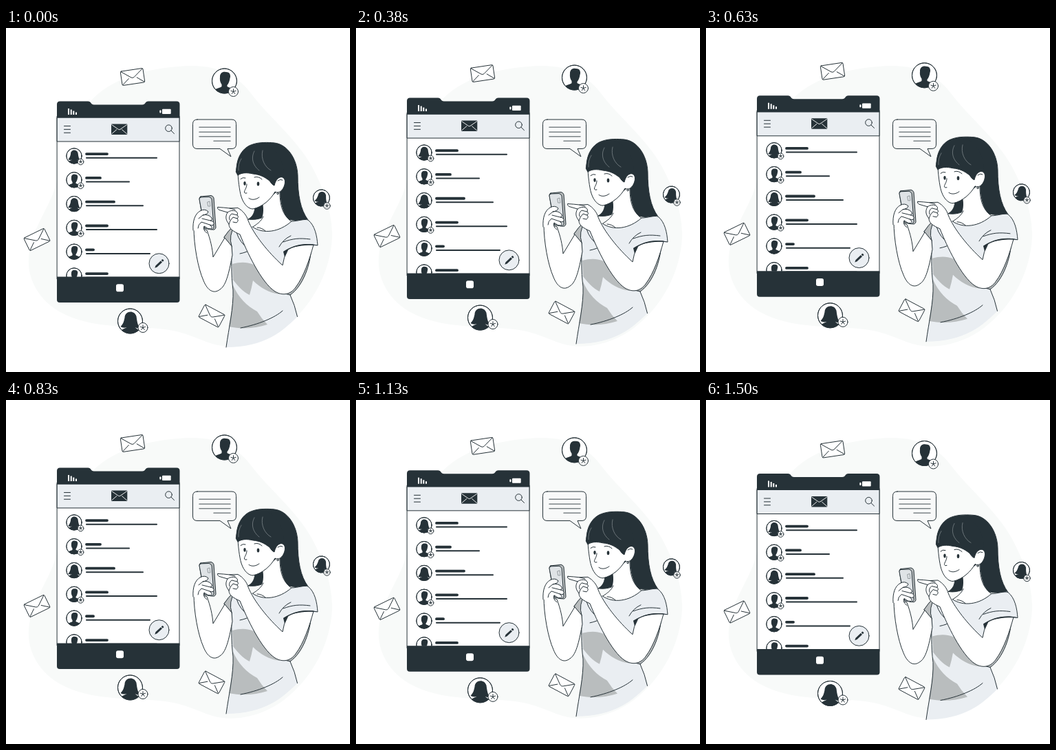
Recreate the animation shown at these times as an HTML page. Size 500 by 500 pixels, loop 1.54 s.

```html
<!DOCTYPE html>
<html lang="en">
<head>
<meta charset="utf-8">
<title>Messages</title>
<style>
  html, body { margin: 0; width: 100%; height: 100%; overflow: hidden; background: #fff; }
  svg { display: block; width: 100%; height: 100%; }
  .line { fill: none; stroke: #263238; stroke-width: 1; stroke-linecap: round; stroke-linejoin: round; }
  .white { fill: #fff; }
  .light { fill: #eaeef2; }
  .dark { fill: #263238; }
  .shade { fill: #b9bdbe; }
  .thin { stroke-width: .8; }
  .line, .line * { vector-effect: non-scaling-stroke; }
</style>
</head>
<body>
<svg viewBox="0 0 500 500">
  <defs>
    <clipPath id="disc"><circle r="18"/></clipPath>
    <clipPath id="screen"><rect x="75" y="165" width="177" height="197"/></clipPath>
    <g id="man">
      <circle r="18" class="line white"/>
      <path clip-path="url(#disc)" class="dark" d="M-6.500-5C-7-11-3-14 2-13C8-13.500 9.500-8 8-4C7.500 0 6 4 4 6V8C7 10 12 10 15 14V20H-14V13C-11 10-6 10-4 8V5C-6 2-7-1-6.500-5Z"/>
      <circle r="18" class="line"/>
    </g>
    <g id="woman">
      <circle r="18" class="line white"/>
      <path clip-path="url(#disc)" class="dark" d="M-8-5C-8-15 6-17 9-7C10 1 11 6 14 10C11 11 9 10 7 9C10 12 12 12 14 15V20H-13V14C-11 11-8 11-5 9C-8 10-11 10-14 8C-10 4-9 0-8-5Z"/>
      <circle r="18" class="line"/>
    </g>
    <g id="badge">
      <circle r="7" class="line white"/>
      <path class="line" d="M0 0V-3.8M0 0L3.6-1.2M0 0L2.2 3.1M0 0L-2.2 3.1M0 0L-3.6-1.2"/>
    </g>
    <g id="envelope" class="line white">
      <rect x="-16.5" y="-10.3" width="33" height="20.6" rx="1.6"/>
      <path class="line" d="M-15.7-9.7L-2 .8Q0 2 2 .8L15.7-9.7M-15.7 9.5L-6 1.8M15.7 9.5L6 1.8"/>
    </g>
  </defs>

  <path fill="#f8faf9" d="M266 55C310 54 337 70 356 95C382 130 424 162 446 204C464 238 474 271 474 301C473 351 447 403 404 436C375 458 334 469 300 459C275 451 258 440 222 437C169 433 112 436 71 408C45 390 31 362 33 334C36 291 64 263 74 223C84 181 94 137 126 103C160 69 215 57 266 55Z"/>

  <g class="line">
    <path fill="#f8f9f9" d="M278 133H328Q334.500 133 334.500 139.500V169Q334.500 175.500 328 175.500H322L327 187L311 175.500H278Q271.500 175.500 271.500 169V139.500Q271.500 133 278 133Z"/>
    <path stroke="#7d8487" stroke-width="1.600" d="M281 144.300H326M281 151.200H326M281 157.800H326M302 164.300H326"/>
  </g>

  <g id="floating">
    <g id="extras"></g>

    <!-- large phone -->
    <path class="line white" d="M74.500 128H252V365H74.500Z"/>
    <path class="line light" d="M74.500 130H252V165H74.500Z"/>
    <path class="dark" d="M74 130.500V111Q74 106.500 78.500 106.500H119C124 106.500 123 111.500 128 111.500H198C203 111.500 202 106.500 207 106.500H248Q252.500 106.500 252.500 111V130.500Z"/>
    <path class="white" d="M90 117H92V126H90ZM93.700 118.500H95.700V126H93.700ZM97.300 120.500H99.300V126H97.300ZM101 122.500H103V126H101Z"/>
    <rect class="white" x="227" y="117.800" width="12.700" height="7.200" rx="1"/>
    <rect class="white" x="223.300" y="119.500" width="2.200" height="4" rx=".8"/>
    <path class="line" d="M84.500 142.500H93.500M84.500 147.400H93.500M84.500 152.300H93.500M240 149.200L244.500 153.600"/>
    <circle class="line" cx="236.500" cy="145.700" r="4.800"/>
    <rect class="dark" x="153" y="139.500" width="23.300" height="15.500" rx="1"/>
    <path fill="none" stroke="#fff" stroke-width=".9" d="M153.500 140.500L163.300 147.300Q164.700 148.200 166 147.300L175.800 140.500M153.500 154L161 147.500M175.800 154L168.300 147.500"/>
    <g id="list" clip-path="url(#screen)"></g>
    <circle class="line light" cx="222.500" cy="342.300" r="14.500"/>
    <path class="dark" d="M216.300 348.800L217.400 345.400L225 338.300L227 340.400L219.600 347.400ZM225.700 337.500L227.300 336Q228.700 336.300 229.500 338.100L227.800 339.700Z"/>
    <path class="dark" d="M74 361.500H252.500V395Q252.500 399 248.500 399H78Q74 399 74 395Z"/>
    <rect class="white" x="160" y="372.300" width="11" height="11" rx="2.800"/>

    <!-- person -->
    <g class="line">
      <path class="dark" d="M335 210C334 189 344 173 359 169C367 166 381 166 390 167C409 169 423 190 424 214C424 243 428 264 439 279C426 281 411 279 402 276L374 275C367 278 360 279 352 278C359 274 362 268 362 258Z"/>
      <path class="white" stroke="none" d="M373 254C375 265 374 274 370 280L358 291L378 300L417 283C407 277 399 266 398 235Z"/>
      <path d="M398 238C398 262 404 274 416 282M374 274C371 281 365 285 359 289M365 290Q372 290 378 296"/>
      <path class="white" d="M337 211C338 226 340 241 343 248C346 256 352 263 359 263C373 260 385 249 391 238C398 242 405 233 405.500 224C406 215 395 213 390 224L383 207Z"/>
      <path class="dark" d="M334.500 209L337 214C343 210 350 210 359 212C369 213 375 216 383 222C385 225 387 228 390 229C392 220 397 215 404 217C404 193 395 178 378 169C354 168 336 184 334.500 209Z"/>
      <path class="thin" stroke="#7b8488" d="M361 179C355 190 360 201 368 207M373 178C370 190 376 202 385 207M342 190Q337 198 338 207"/>
      <path d="M341 219.500Q344 216.500 348 218M361 217Q367 215 372 220M350 227C350 233 346 236 346.500 239Q347 241 350 240M353 247.500C358 251 364 249 368 246M395 222Q399 219 402 221"/>
      <ellipse class="dark" stroke="none" cx="347" cy="226" rx="1.700" ry="2.900"/>
      <ellipse class="dark" stroke="none" cx="366.500" cy="226.500" rx="1.800" ry="3"/>
      <circle class="white" cx="395" cy="240.500" r="1.300"/>

      <!-- shirt -->
      <path class="light" stroke="none" d="M333 284L358 289C373 300 397 297 415 281L438 278C448 286 451 301 453 316L444 319C443 344 430 374 413 387L424 419C402 441 376 464 320 464C324 435 331 406 330 381C327 355 329 334 328 316L317 304Z"/>
      <path class="shade" stroke="none" d="M329 343C347 338 361 342 368 350L398 387C382 385 369 377 359 367Q357 378 354 388C344 383 337 375 330 366Z"/>
      <path class="shade" stroke="none" d="M330 374C338 392 350 404 365 412Q371 422 380 431C362 437 342 438 324 434C328 413 331 395 330 374Z"/>
      <path class="shade" d="M444 317C443 343 432 375 413 388L405 386L434 326Z"/>
      <path d="M333 285L317 304L328 317C328 335 327 357 330 381C331 406 324 435 320 464M358 289C374 300 397 297 415 281C424 281 433 277 439 279C449 287 452 302 453 316C438 313 418 316 404 325M413 388Q420 403 423.500 419.500M402 411C391 421 367 431 341 436M340 328Q350 326 356 322M335 297Q340 313 352 320M403 311C417 306 426 305 442 307M397 318Q403 307 414 302"/>
      <path class="shade" d="M317 304Q323 294 333 286Q323 302 328 317Z"/>

      <!-- arm holding the small phone -->
      <path class="white" d="M273 290C273 316 279 349 287 367C293 382 302 387 311 380C321 374 325 350 329 330L328 317L318 305L301 333C300 320 297 307 292 294Z"/>
      <path class="shade" d="M283 245L298 243.500Q301 244 302 247L305 290Q304 294 300 293L288 291L281 248Q281 245.500 283 245Z"/>
      <path fill="#dfe3e6" d="M283 246L295 245.500Q298 246 299 249L302 290Q301 293 298 293L289 291L281 249Q281 246.500 283 246Z"/>
      <path class="thin" d="M293 253L296 252L297 259L294 259Z" stroke="#858c90"/>
      <path class="white" d="M272 294C271 280 275 270 282 266Q289 262 294 267Q293 271 286 272Q294 270 299 276Q301 279 297 280Q303 281 302 285Q301 288 296 286Q301 290 298 292Q294 293 288 288C286 292 289 296 292 298"/>
      <path d="M286 272L280 277M297 280L285 277M296 286L284 282Q279 286 279 291"/>

      <!-- pointing arm -->
      <path class="white" d="M308 260.500Q317 261 325 262L337 261.500C345 266 350 273 352 280C360 300 381 326 402 345Q403 334 410 322C422 315 436 314 447 315C441 337 433 361 421 377C414 387 403 390 391 383C371 370 350 325 340 300C331 296 324 292 324 285C320 280 318 275 322 268L310 264.500Q306 262 308 260.500Z"/>
      <path d="M322 268Q327 264 334 266Q338 269 336 272L328 270Q323 274 325 279M336 272Q339 274 336 277L330 275Q325 280 324 285M336 277Q339 280 335 283L330 282M325 262L333 264"/>
      <path class="dark" stroke="none" d="M403 325C416 316 434 311 453 316C436 315 420 317 410 321.500L405 333Z"/>
    </g>
  </g>
</svg>
<script>
  const byId = id => document.getElementById(id);
  const use = (id, x, y, scale = 1, turn = 0) =>
    `<use href="#${id}" transform="translate(${x} ${y}) rotate(${turn}) scale(${scale})"/>`;
  const bar = (end, y, width) =>
    `<path d="M117 ${y}H${end}" stroke="#263238" stroke-width="${width}" stroke-linecap="round"/>`;

  byId('extras').innerHTML =
    use('envelope', 184, 71, 1, -8.5) + use('envelope', 45, 307.5, 1, -26) + use('envelope', 299, 418.5, 1, 28) +
    use('man', 317.5, 77) + use('badge', 330.5, 92.5) +
    use('woman', 180.5, 426) + use('badge', 199, 435.5) +
    use('woman', 458.5, 247, .67, 8) + use('badge', 466.5, 258.5, .68);

  // Icon, end of the name, end of the subject, badge shown
  const rows = [
    ['woman', 147, 219, 1], ['man', 137, 179, 1], ['woman', 157, 199, 0],
    ['man', 147, 219, 1], ['man', 127, 209, 0], ['man', 147, 219, 0]
  ];
  byId('list').innerHTML = rows.map(([icon, name, subject, badge], i) => {
    const y = 186 + 34.8 * i;
    return use(icon, 99, y, .62) + (badge ? use('badge', 108.5, y + 8.5, .62) : '') +
      bar(name, y - 2.9, 3.8) + bar(subject, y + 2.7, 2);
  }).join('');

  const PERIOD = 1540, LEAD = 45, HEIGHT = 10;
  const lift = time => HEIGHT * (1 - Math.abs(1 - 2 * ((time + LEAD) / PERIOD % 1)));
  const floating = byId('floating');
  function draw() {
    const y = lift(0) - lift(performance.now());
    floating.setAttribute('transform', `translate(0 ${y.toFixed(3)})`);
    requestAnimationFrame(draw);
  }
  draw();
</script>
</body>
</html>
```
